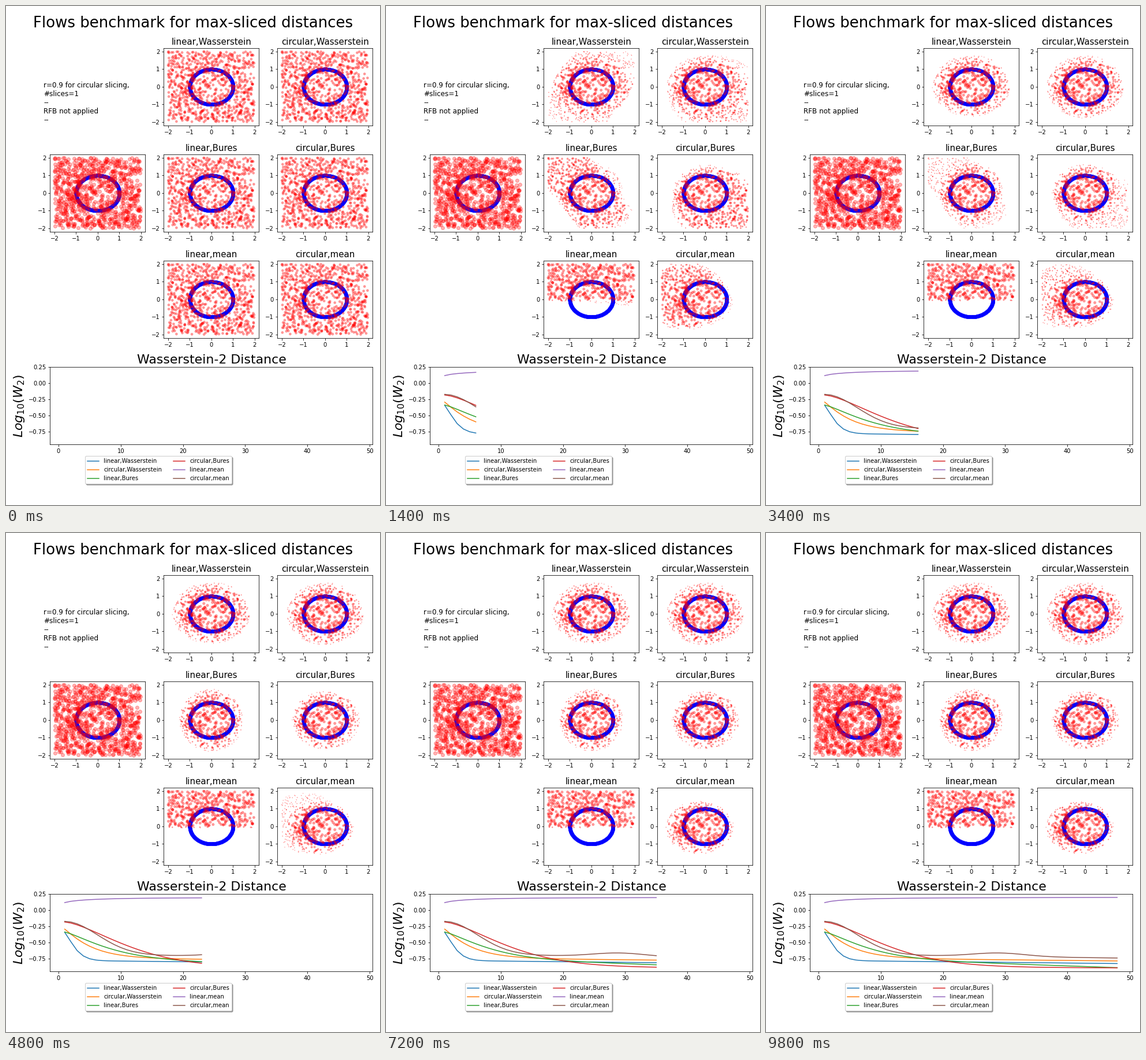
Recreate the animation shown at these times as a matplotlib script. Size 648 by 864 pixels, loop 10 s.

```python
import numpy as np
import matplotlib.pyplot as plt
from matplotlib.animation import FuncAnimation

W, H, DPI = 648, 864, 72
FRAMES, INTERVAL = 50, 200
N = 900
EARLY = 3  # step at which the first shape is reached

plt.rcParams["font.family"] = "DejaVu Sans"
pts = np.random.RandomState(7).uniform(-2, 2, (N, 2))
angle = np.linspace(0, 2 * np.pi, 450)

fig = plt.figure(figsize=(W / DPI, H / DPI), dpi=DPI, facecolor="white")


def add_axes(col, row, width):
    left, bottom = 76.4 + 197 * col, H - 206.9 - 184 * row
    return fig.add_axes([left / W, bottom / H, width / W, 134 / H])


def cloud_axes(col, row, title=""):
    ax = add_axes(col, row, 165)
    ax.set(xlim=(-2.2, 2.2), ylim=(-2.2, 2.2),
           xticks=range(-2, 3), yticks=range(-2, 3))
    ax.set_title(title, fontsize=15)
    ax.scatter(np.cos(angle), np.sin(angle), s=34, c="blue", alpha=0.3)
    return ax


def disk(cx, cy, rx, ry=None, soft=0.5):
    """Weight 1 near the centre, falling to 0 at the rim of an ellipse."""
    rho = np.hypot((pts[:, 0] - cx) / rx, (pts[:, 1] - cy) / (ry or rx))
    return np.clip((1 - rho) / soft, 0, 1)


def slab(normal, offset, half, soft=0.3):
    """Weight 1 inside a straight band, falling to 0 at its edges."""
    t = np.radians(normal)
    d = np.abs(pts @ [np.cos(t), np.sin(t)] - offset)
    return np.clip((half - d) / soft, 0, 1)


class Flow:
    """A cloud whose points lose mass: first a cut, then an eased settling."""

    def __init__(self, col, row, title, early, late, tau):
        ax = cloud_axes(col, row, title)
        self.dots = ax.scatter(*pts.T, s=11, c="red", alpha=0.3)
        self.early, self.late, self.tau = early, late, tau

    def show(self, k):
        cut = min(k / EARLY, 1)
        settle = 1 - np.exp(-max(k - EARLY, 0) / self.tau)
        w = 1 + cut * (self.early - 1)
        w += settle * (self.late - w)
        w[w < 0.04] = 0
        self.dots.set_sizes(11 * w * w.mean() ** -0.2)
        self.dots.set_linewidths(1.5 * w ** 0.25)


names = [f"{kind},{metric}" for metric in ("Wasserstein", "Bures", "mean")
         for kind in ("linear", "circular")]
# Shape after the first steps, shape at rest, settling time
moves = [
    (slab(-30, 0, 1.75) * disk(0, 0, 2.9), disk(0, 0.05, 1.85, 1.78), 2.5),
    (disk(0.45, -0.4, 2.3, soft=0.3), disk(0, 0, 1.82), 2.5),
    (slab(33, -0.25, 1.35) * disk(-0.5, 0.5, 3.1, soft=0.3),
     disk(0, 0, 1.5, 1.8), 6),
    (disk(0.5, -0.6, 2.1, soft=0.25), disk(0.02, 0, 1.58, 1.68), 6),
    (slab(85, 3, 3.3, soft=0.5), slab(90, 3, 3.1, soft=0.2), 2.5),
    (disk(-0.95, 0.2, 1.97, soft=0.25), disk(-0.25, -0.08, 1.6, 1.53), 8),
]
flows = [Flow(1 + i % 2, i // 2, name, *move)
         for i, (name, move) in enumerate(zip(names, moves))]

cloud_axes(0, 1).scatter(*pts.T, s=36, c="red", alpha=0.3)

fig.suptitle("Flows benchmark for max-sliced distances", fontsize=26)
fig.text(65 / W, 1 - 131.1 / H,
         "r=0.9 for circular slicing,\n#slices=1\n--\nRFB not applied\n--",
         fontsize=12, va="top")

step = np.arange(1, 49)


def decay(start, end, scale, power, drift):
    x = step - 1
    return end + (start - end) * np.exp(-(x / scale) ** power) - drift * x


curves = [
    decay(-0.34, -0.775, 1.95, 1.35, 0.001),
    decay(-0.29, -0.735, 4.5, 1.1, 0.001),
    decay(-0.335, -0.73, 8, 1.3, 0.0033),
    decay(-0.18, -0.875, 12.3, 1.5, 0.0003),
    decay(0.12, 0.19, 4, 0.8, -0.0002),
    decay(-0.17, -0.68, 7.4, 2, 0.0012)
    + 0.055 * np.exp(-((step - 29) / 6) ** 2),
]

chart = add_axes(0, 3, 559)
chart.set(xlim=(-1.35, 50.5), ylim=(-0.942, 0.254), xticks=range(0, 51, 10),
          yticks=np.arange(-0.75, 0.3, 0.25))
chart.set_title("Wasserstein-2 Distance", fontsize=22)
chart.set_ylabel("$Log_{10}(W_2)$", fontsize=22)
lines = [chart.plot([], [], lw=1.5, label=name)[0] for name in names]
chart.legend(loc="upper left", bbox_to_anchor=(137.2 / W, 1 - 779.4 / H),
             bbox_transform=fig.transFigure, borderaxespad=0, ncol=2,
             fontsize=10, fancybox=True, shadow=True)


def draw(k):
    for flow in flows:
        flow.show(k)
    n = max(k - 1, 0)
    for line, y in zip(lines, curves):
        line.set_data(step[:n], y[:n])
    return lines + [flow.dots for flow in flows]


anim = FuncAnimation(fig, draw, frames=FRAMES, interval=INTERVAL,
                     init_func=lambda: draw(0), repeat=True, repeat_delay=0)
plt.show()
```
